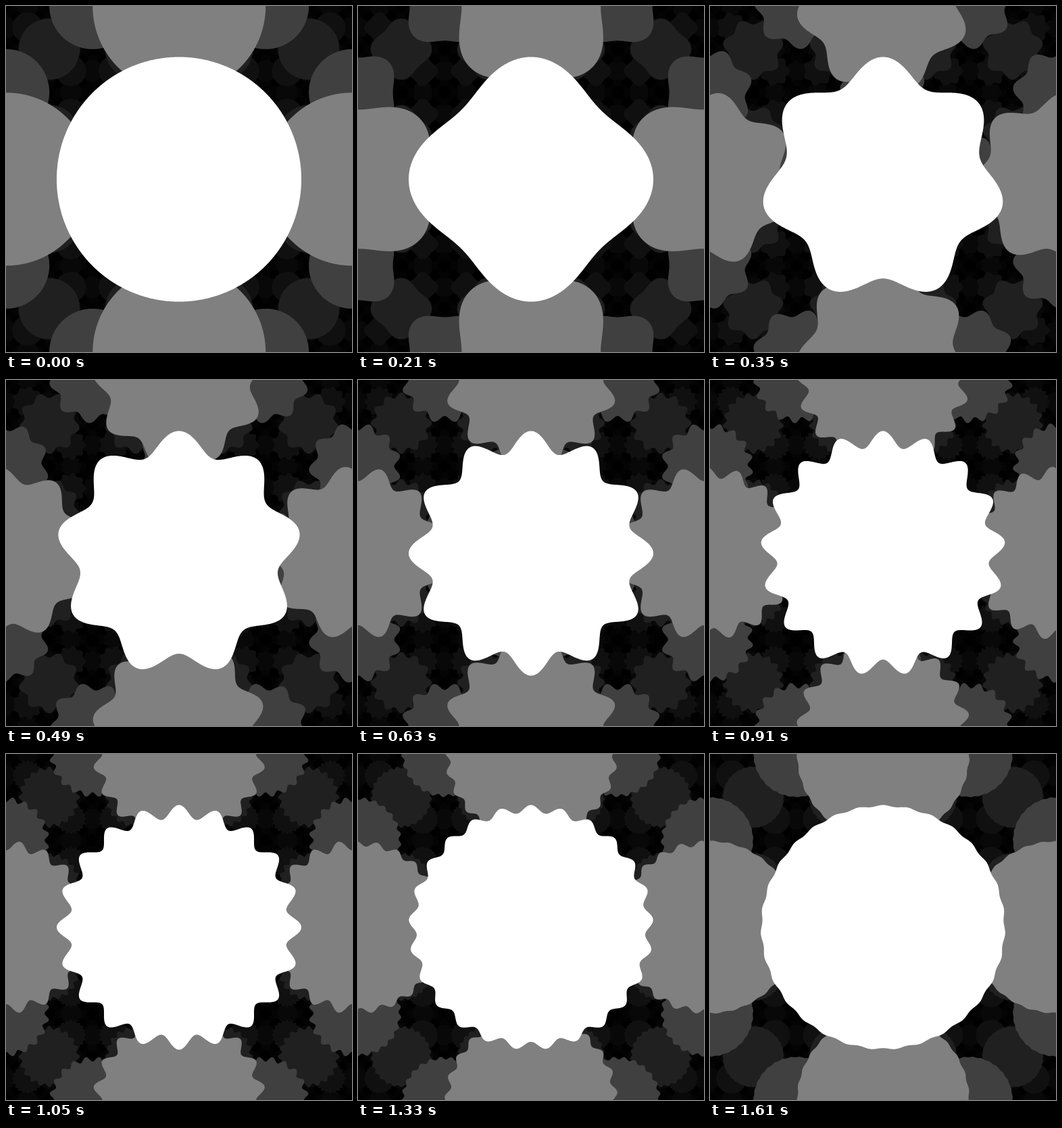
Animation of 512x512 px, one loop 1680 ms. Source, as an HTML page with a canvas:

```html
<!DOCTYPE html>
<html lang="en">
<head>
<meta charset="utf-8">
<title>Nested gears</title>
<style>
  html, body { margin: 0; width: 100%; height: 100%; overflow: hidden; background: #000; }
  canvas { display: block; width: 512px; height: 512px; }
</style>
</head>
<body>
<canvas id="stage" width="512" height="512"></canvas>
<script>
const SIZE = 512, RADIUS = SIZE / Math.SQRT2 / 2;
const STEP = 70, STEPS = 24, LOBES = 32, DEPTH = 0.2;
const DROP = 0.5; // gears sit half a pixel below the middle of their cell
const ctx = document.getElementById('stage').getContext('2d');

// Each level is the same square lattice, shrunk by √2 and turned 45° per unit of power.
function makeLayer(power, index) {
  const scale = 2 ** (-power / 2), angle = -power * Math.PI / 4;
  const a = scale * Math.cos(angle), b = scale * Math.sin(angle);
  const reach = RADIUS * scale + 1, span = Math.ceil(1.5 / scale) + 2;
  const seen = v => v > -reach && v < SIZE + reach;
  const centers = [];
  for (let i = -span; i <= span; i++) {
    for (let j = -span; j <= span; j++) {
      const u = (i + 0.5) * SIZE, v = (j + 0.5) * SIZE + DROP;
      const x = a * u - b * v, y = b * u + a * v;
      if (seen(x) && seen(y)) centers.push([x, y]);
    }
  }
  const shade = Math.min(255, 2 ** (8 - index));
  const points = power < 3 ? 1080 : power < 6 ? 540 : 240;
  return { a, b, centers, points, color: `rgb(${shade},${shade},${shade})` };
}

const layers = [0, 1, 3, 4, 6, 7, 9, 10].map(makeLayer).reverse();

function gear(lobes, depth, points) {
  const path = new Path2D();
  for (let i = 0; i < points; i++) {
    const t = i / points * 2 * Math.PI;
    const r = RADIUS * (1 - depth * (1 - Math.cos(lobes * t)) / 2);
    path.lineTo(r * Math.sin(t), -r * Math.cos(t));
  }
  path.closePath();
  return path;
}

function draw(step) {
  const lobes = Math.round(LOBES * step / STEPS);
  const depth = DEPTH * Math.cos(step / STEPS * Math.PI / 2);
  ctx.setTransform(1, 0, 0, 1, 0, 0);
  ctx.fillStyle = '#000';
  ctx.fillRect(0, 0, SIZE, SIZE);
  for (const { a, b, centers, points, color } of layers) {
    const path = gear(lobes, depth, points);
    ctx.fillStyle = color;
    for (const [x, y] of centers) {
      ctx.setTransform(a, b, -b, a, x, y);
      ctx.fill(path);
    }
  }
}

const start = performance.now();
let shown = -1;

function tick() {
  const step = Math.floor((performance.now() - start) / STEP) % STEPS;
  if (step !== shown) draw(shown = step);
  requestAnimationFrame(tick);
}
tick();
</script>
</body>
</html>
```
